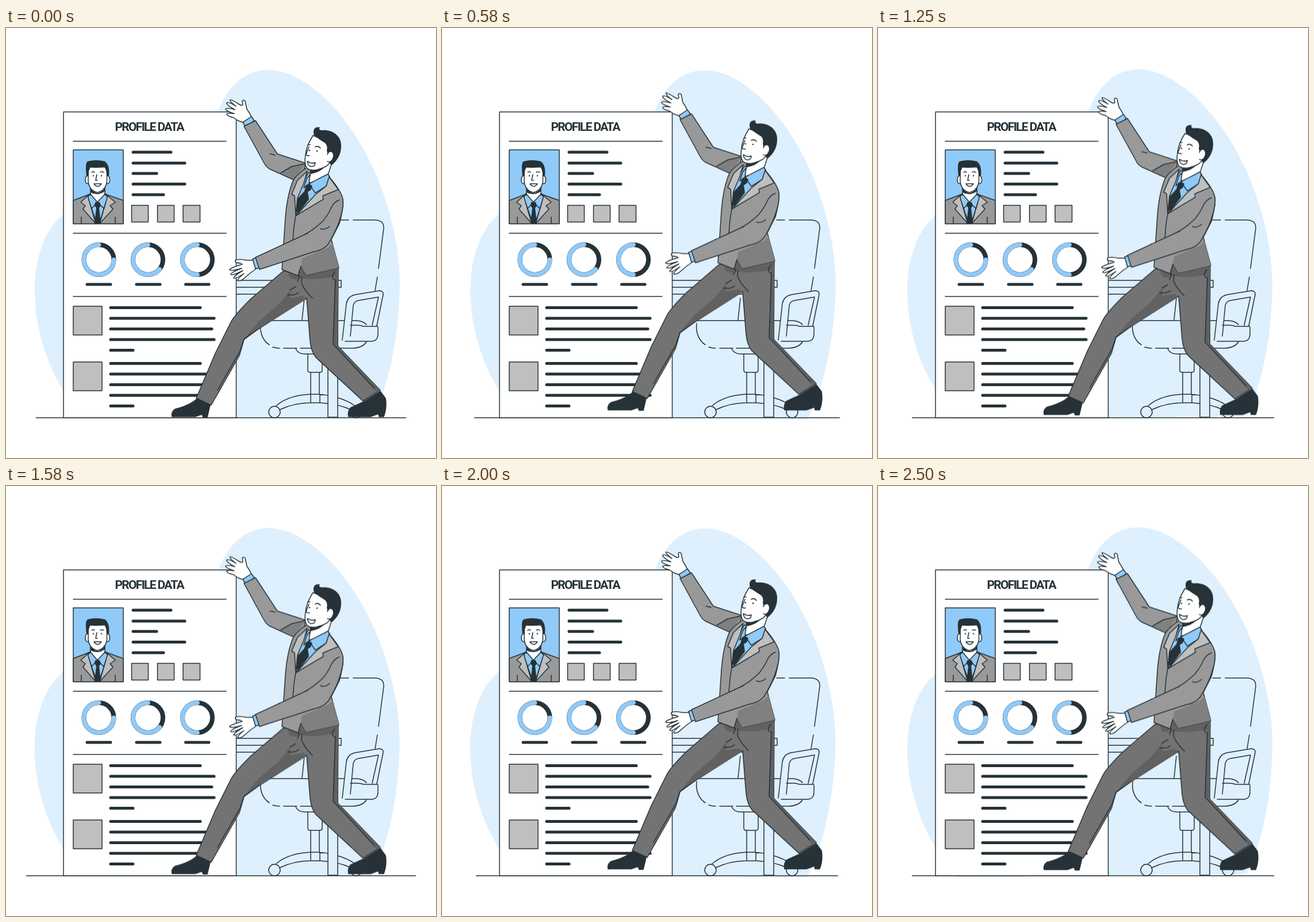
These frames come from a looping animation (748 by 748 pixels, 2540 ms). An HTML page:

```html
<!DOCTYPE html>
<html lang="en">
<head>
<meta charset="utf-8">
<title>Profile data</title>
<style>
  html, body { margin: 0; width: 100%; height: 100%; overflow: hidden; background: #fff; }
  svg { display: block; width: 100%; height: 100%; }
  .line { fill: none; stroke: #263238; stroke-width: 1.5; stroke-linecap: round; stroke-linejoin: round; }
  .bar { fill: none; stroke: #263238; stroke-width: 5; stroke-linecap: round; }
  .ink { fill: #263238; }
  .white { fill: #fff; }
  .pale { fill: #deeffd; }
  .blue { fill: #90caf9; }
  .g1 { fill: #bfbfbf; }
  .g2 { fill: #999; }
  .g3 { fill: #808080; }
  .g4 { fill: #737373; }
  .g5 { fill: #616161; }
  .flat { stroke: none; }
  .ring { fill: none; stroke: #263238; stroke-width: 8; }
  .arc { fill: none; stroke: #90caf9; stroke-width: 7.6; stroke-linecap: round; }
  text { font: 700 21px Roboto, "Liberation Sans", sans-serif; letter-spacing: -1.7px; fill: #263238; }

  .blob, .floor, .man { animation: 2540ms linear infinite; }
  .blob { animation-name: sway; transform-origin: 368px 376px; }
  .floor { animation-name: beat; transform-origin: 374px 678px; }
  .man { animation-name: bob; }

  @keyframes sway {
    0% { transform: rotate(.088deg); }
    13.465%, 72.52% { transform: rotate(1deg); }
    42.992% { transform: rotate(-1deg); }
    100% { transform: rotate(-.861deg); }
  }
  @keyframes beat {
    0% { transform: scaleX(1.022); }
    4.606%, 28.228%, 63.661%, 87.283% { transform: scaleX(1.1); }
    16.417%, 22.323%, 34.134%, 57.756%, 75.472%, 81.378%, 93.189%, 100% { transform: scaleX(1); }
  }
  @keyframes bob {
    0% { transform: translateY(0); }
    28.228%, 87.283% { transform: translateY(-14.3px); }
    57.756% { transform: translateY(.66px); }
    100% { transform: translateY(-7.9px); }
  }
</style>
</head>
<body>
<svg viewBox="0 0 748 748">
  <path class="blob pale" d="M135 678C100 640 50 560 50 455C50 400 68 350 100 324C180 262 330 245 368 146C385 103 412 73 457 73C510 73 580 130 628 222C665 292 686 380 685 450C684 540 665 625 638 678Z"/>

  <!-- chair -->
  <g class="line">
    <path d="M582 334H596M604 334H643Q658 335 657 349L648 418M646 433L642 457"/>
    <path d="M519 470L515 508M443 509H610Q622 510 627 516M443 514C441 530 447 544 458 551M464 555Q470 557 476 557M483 557H506M512 557H604Q621 556 627 546"/>
    <path d="M504 558Q508 567 519 567H556M525 567V595Q525 599 529 599H546Q550 599 550 595V567M530 599V637M545 599V637"/>
    <path d="M470 657C490 640 515 637 537 637C562 637 590 645 607 657M476 664C495 655 515 652 530 652H546C566 653 585 657 600 664M530 637V652M546 637V652"/>
    <circle cx="467" cy="668" r="10"/>
    <circle cx="609" cy="668" r="10"/>
    <path class="pale" d="M585 543L592 480Q594 467 607 464L649 457Q657 457 656 464L645 518Q648 519 647 527V534Q646 545 635 545H590M637 517L648 468L613 474Q606 475 604 483L599 536M599 517H610Q617 517 622 519H645"/>
  </g>

  <!-- desk -->
  <g class="line">
    <path class="pale" d="M560 451H577V677H560Z"/>
    <path class="pale" d="M400 439H583V451H400Z"/>
    <path d="M401 463H545M576 439V451"/>
  </g>

  <path class="floor line" d="M59.5 678H688.5"/>

  <!-- card -->
  <g class="line">
    <path class="white" d="M100 146H400.5V678H100Z"/>
    <path d="M117 197H383M117 357H383M117 467H383"/>
    <path class="g1" d="M218.500 308.500H247.500V337.500H218.500ZM263.500 308.500H292.500V337.500H263.500ZM308 308.500H337.500V337.500H308Z"/>
    <path class="g1" d="M117 484H167V534H117ZM117 581H167V631H117Z"/>
  </g>
  <text x="249.200" y="178.500" text-anchor="middle">PROFILE DATA</text>
  <path class="bar" d="M221 216H287M221 235H311M221 253H262M221 271.500H311M221 290H274M141 446H182M227 446H268M312.500 446H353"/>
  <path id="para" class="bar" d="M182 486.500H338M182 505H362M182 523.500H358M182 542H362M182 560.500H221"/>
  <use href="#para" y="97"/>
  <g class="ring">
    <circle cx="161.500" cy="403" r="26"/>
    <circle cx="247" cy="403" r="26"/>
    <circle cx="333" cy="403" r="26"/>
  </g>
  <path class="arc" d="M187.500 403A26 26 0 1 1 161.500 377M267 419.700A26 26 0 1 1 247 377M333 429A26 26 0 0 1 333 377"/>

  <!-- portrait -->
  <g class="line">
    <path class="blue" d="M117 212H204V340.500H117Z"/>
    <path class="g2" d="M117 340.500V300L146 289H173L204 300V340.500Z"/>
    <path class="blue" d="M146 288L142 294L158 340H162L177 294L173 288Z"/>
    <path class="white" d="M147 276V291L159 303L172 291V276Z"/>
    <path class="ink flat" d="M147 279Q159 295 172 279V284Q160 293 147 286Z"/>
    <path class="blue" d="M147 289L142 294L149 314L159 303L170 314L177 294L172 289L159 303Z"/>
    <path class="ink flat" d="M155 303H163L165 309L162 313L165 340H154L157 313L154 309Z"/>
    <path class="g1" d="M142 292L130 303L138 309L134 315L156 340L142 292M177 292L190 303L181 309L186 315L163 340Z"/>
    <path d="M131 329V340M190 329V340"/>
    <ellipse class="white" cx="141.500" cy="264" rx="3.500" ry="7"/>
    <ellipse class="white" cx="177" cy="264" rx="3.500" ry="7"/>
    <path class="white" d="M143 246V268Q146 284 159 286Q172 284 175.500 268V242H146Z"/>
    <path class="ink flat" d="M140 257Q137 235 142 232Q157 228 172 232Q181 239 179 257H175.500Q175 248 171 241Q157 245 147 242Q143 249 143.500 257Z"/>
    <path class="white" d="M153 271H166Q159.500 280 153 271Z"/>
    <path d="M158 255L156 265H159M149 251Q152 249 154 251M164 251Q167 249 170 251"/>
    <circle class="ink flat" cx="152" cy="257" r="1.200"/>
    <circle class="ink flat" cx="166" cy="257" r="1.200"/>
  </g>

  <g class="man line">
    <!-- shoes -->
    <path class="ink" d="M332 645Q321 656 294 663Q287 668 289 676H329L341 672L343 677H350L355 656Z"/>
    <path class="ink" d="M623 650Q609 656 599 661Q594 668 596 676H634L648 671L649 676H657Q663 660 660 644L651 632Z"/>

    <!-- trousers -->
    <path class="g4" d="M482 423L425 472Q397 500 391 512L364 566L331 644L357 656L406 570L414 542L440 523L523 470L529 545Q531 563 539 573L621 649L651 630L577 553L578 418Z"/>
    <path class="g5 flat" d="M495 456L474 481L440 510L414 541L440 523L522 472L517 466L494 470Z"/>
    <path class="g5 flat" d="M414 541L407 562L366 641L357 656L406 570ZM572 432L569 548L645 634L651 630L577 553L578 430Z"/>
    <path class="g5 flat" d="M488 421L508 431L513 414L522 430L578 418V431Q540 440 513 435Q500 440 494 434Z"/>
    <path d="M440 523L414 541L407 562L368 630M572 424Q563 436 573 438L569 550L640 626M505 428L511 432L507 441M515 433L514 443Q518 455 533 470M490 464Q503 466 509 460M494 456L504 450"/>

    <!-- raised arm -->
    <path class="white" d="M412 164Q403 162 396 156Q384 153 384 150Q385 147 397 149Q382 144 382 141Q383 138 398 142Q383 134 384 130Q387 128 400 136Q388 127 390 125Q392 124 406 133Q411 136 412 133L411 127Q413 124 416 127L419 141Q424 148 427 155Z"/>
    <path class="blue" d="M412 164L427 154L432 161L417 172Z"/>
    <path class="g2" d="M414 171L434 161L472 219L521 235L516 262L500 264L458 245Q452 241 449 235Z"/>
    <path class="g3 flat" d="M478 253L497 241L521 236L502 263Z"/>
    <path d="M468 221L459 219M478 252L497 241L520 236"/>

    <!-- torso -->
    <path class="g2" d="M523 243Q507 254 500 264Q489 290 486 330L480 420L508 431L513 414L522 430L579 417L566 368L580 340Q588 310 586 298Q584 285 564 261L545 252Z"/>
    <path class="g3 flat" d="M515 401L560 382L568 374L579 417L522 430L513 414Z"/>
    <path class="blue" d="M526 252L517 268L507 296L505 326L546 290L563 258Z"/>
    <path class="white" d="M533 242L529 256L526 270L545 265L560 256L567 234Z"/>
    <path class="ink flat" d="M528 245Q540 250 556 240Q547 251 530 254Z"/>
    <path class="blue" d="M529 255L523 262L518 278L527 271L538 287L557 275L563 259L560 254L527 271Z"/>
    <path class="ink flat" d="M522 273L528 271L533 275L530 282L525 285L527 298L508 323L505 318L507 297L519 284Z"/>
    <path class="g1" d="M562 259L578 281L551 292L552 298L505 326L538 290L557 275ZM524 249L507 265L497 289L502 292L504 326L507 296L518 270Z"/>
    <path d="M504 326L501 345L499 369"/>

    <!-- near arm -->
    <path class="white" d="M430 404L418 404Q405 401 399 404Q397 409 408 409L411 411Q391 417 389 420Q390 424 410 418Q391 425 391 429Q394 431 412 422Q396 432 396 435Q399 437 414 427Q403 436 403 439Q408 442 417 433Q426 425 435 419Z"/>
    <path class="blue" d="M429 402L436 399L441 417L434 419Z"/>
    <path class="g2 flat" d="M434 399L516 361Q545 339 570 304L586 298Q586 322 578 342Q565 374 557 381Q549 386 536 389L441 420Z"/>
    <path d="M551 336Q533 353 516 361L434 399L441 420L536 389Q553 386 561 375Q576 349 580 335Q588 312 586 298M551 336Q561 324 566 312Q571 302 580 299M516 361L525 357M547 349Q555 352 563 345"/>

    <!-- head -->
    <path class="white" d="M534 187C527 198 522 208 521 221C519 234 520 241 525 245C533 250 548 246 558 240L563 235L570 226L572 214L558 196Z"/>
    <path class="ink flat" d="M536 187C533 177 537 171 546 173Q543 177 549 178C567 176 584 187 583 206C583 221 575 232 566 239L563 235L558 213Q560 205 555 200Q546 195 536 187Z"/>
    <path class="white" d="M559 220Q562 212 568 216Q572 223 567 230Q563 235 559 232"/>
    <path class="white" d="M524 232Q532 237 538 234Q538 241 531 241Q525 240 524 232Z"/>
    <path d="M527 207L522 220Q523 223 528 222M538 207Q543 204 547 209M525 203L529 203"/>
    <circle class="ink flat" cx="528" cy="213" r="1.300"/>
    <circle class="ink flat" cx="541" cy="214" r="1.300"/>
  </g>
</svg>
</body>
</html>
```
